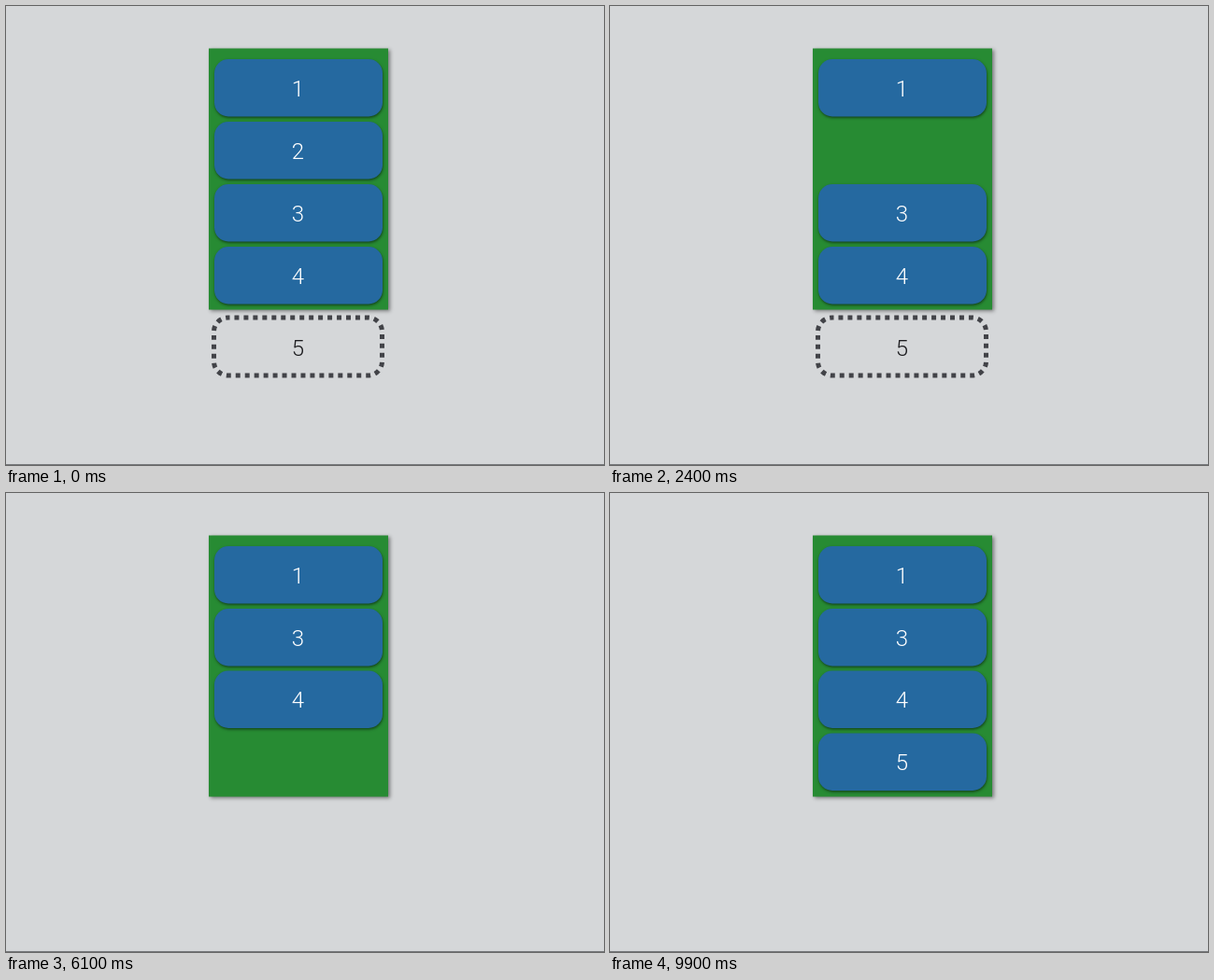
An HTML page with a canvas that plays this animation: 640x492 px, repeating every 10 s.

```html
<!DOCTYPE html>
<html lang="en">
<head>
<meta charset="utf-8">
<title>List item removal</title>
<style>
  html, body { margin: 0; width: 100%; height: 100%; overflow: hidden; background: #d5d7d9; }
  canvas { display: block; width: 640px; height: 492px; }
</style>
</head>
<body>
<canvas id="stage" width="640" height="492"></canvas>
<script>
const ctx = document.getElementById('stage').getContext('2d');
const LOOP = 10000, STEP = 100;
const LEFT = 223, CELL_W = 180, CELL_H = 61.5, RADIUS = 15;
const OFFSCREEN = 428;

// Eased progress of a move that starts at `start` and lasts `length` ms
function ease(t, start, length) {
  const p = Math.min(1, Math.max(0, (t - start) / length));
  return (1 - Math.cos(Math.PI * p)) / 2;
}

function setShadow(alpha, blur, x, y) {
  ctx.shadowColor = `rgba(0, 0, 0, ${alpha})`;
  ctx.shadowBlur = blur;
  ctx.shadowOffsetX = x;
  ctx.shadowOffsetY = y;
}

function label(text, x, y, color) {
  ctx.fillStyle = color;
  ctx.font = '300 24px Roboto, "Liberation Sans", sans-serif';
  ctx.textAlign = 'center';
  ctx.textBaseline = 'alphabetic';
  ctx.fillText(text, x, y);
}

function roundRect(x, y, w, h) {
  ctx.beginPath();
  ctx.roundRect(x, y, w, h, RADIUS);
}

function cell(text, y, dx = 0) {
  if (dx >= OFFSCREEN) return;
  const x = LEFT + dx;
  ctx.save();
  setShadow(0.5, 3, 0.5, 1.5);
  ctx.fillStyle = '#2569a0';
  roundRect(x, y, CELL_W, CELL_H);
  ctx.fill();
  ctx.restore();
  label(text, x + 89.5, y + 39.5, '#fff');
}

function panel() {
  ctx.save();
  setShadow(0.45, 4, 1.5, 1.5);
  ctx.fillStyle = '#278b33';
  ctx.fillRect(217, 45.5, 192, 280);
  ctx.restore();
}

function placeholder(alpha) {
  if (alpha <= 0) return;
  ctx.save();
  ctx.globalAlpha = alpha;
  ctx.strokeStyle = '#424348';
  ctx.lineWidth = 5;
  const dash = (2 * (180 + 62) - 8 * RADIUS + 2 * Math.PI * RADIUS) / 92;
  ctx.setLineDash([dash, dash]);
  ctx.lineDashOffset = 3;
  roundRect(222.5, 334, 180, 62);
  ctx.stroke();
  label('5', 312.5, 375, '#1b1b1e');
  ctx.restore();
}

function draw(t) {
  const swipe = ease(t, 550, 1000);
  const lift = ease(t, 2450, 1000);
  const fade = ease(t, 4150, 470);
  const enter = ease(t, 7300, 1000);

  ctx.fillStyle = '#d5d7d9';
  ctx.fillRect(0, 0, 640, 492);
  ctx.fillStyle = '#77797c';
  ctx.fillRect(0, 491, 640, 1);

  panel();
  placeholder(1 - fade);
  cell('1', 57);
  cell('2', 124, OFFSCREEN * swipe);
  cell('3', 191 - 67 * lift);
  cell('4', 258 - 67.5 * lift);
  cell('5', 257.5, OFFSCREEN * (1 - enter));
}

function tick() {
  const t = performance.now() % LOOP;
  draw(Math.floor(t / STEP) * STEP);
  requestAnimationFrame(tick);
}
tick();
</script>
</body>
</html>
```
